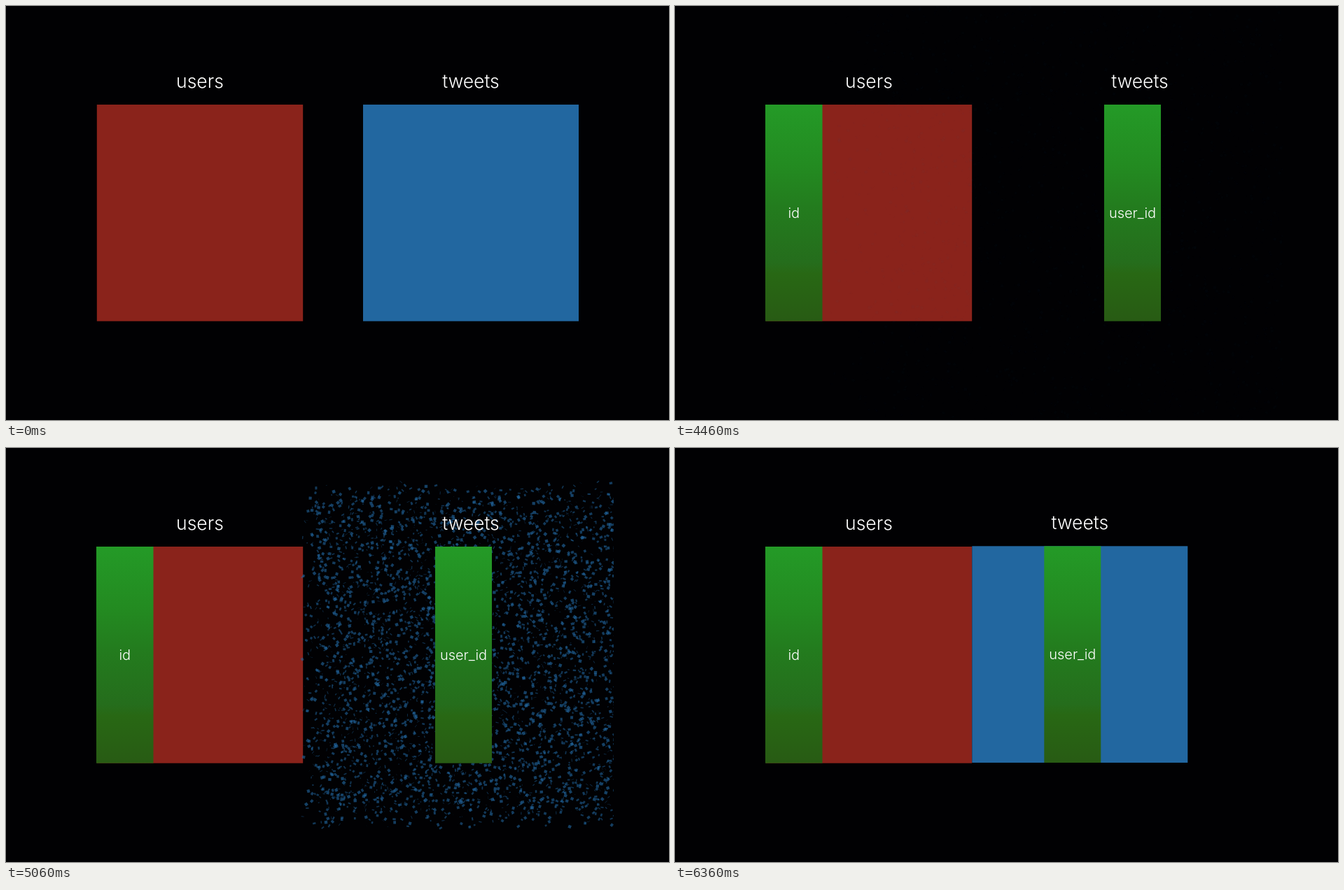
Animation, 947 px wide and 592 px high, one loop 8.66 s. Source, as an HTML page with a canvas:

```html
<!DOCTYPE html>
<html lang="en">
<head>
<meta charset="utf-8">
<title>Joining two tables</title>
<style>
  html, body { margin: 0; width: 100%; height: 100%; overflow: hidden; background: #010103; }
  canvas { display: block; }
</style>
</head>
<body>
<canvas id="stage" width="947" height="592"></canvas>
<script>
const ctx = document.getElementById('stage').getContext('2d');
const LOOP = 8660;
const AT = { keys: 1300, hide: 3230, scatter: 4460, solid: 5427, join: 6360 };
const STEP = 100 / 3;
const RED = '#8a231b', BLUE = '#2267a0', BG = '#010103';
const TOP = 141, SIZE = 309.7;
const FONT = 'Inter, "Liberation Sans", Arial, sans-serif';

// Seeded random numbers keep the confetti identical in every loop
let seed = 4711;
function random() {
  seed = (seed + 0x6d2b79f5) | 0;
  let n = Math.imul(seed ^ (seed >>> 15), 1 | seed);
  n = (n + Math.imul(n ^ (n >>> 7), 61 | n)) ^ n;
  return ((n ^ (n >>> 14)) >>> 0) / 4294967296;
}
const spread = r => (random() * 2 - 1) * r;

const GRID = 70, CELL = 308 / GRID;
const tiles = Array.from({ length: GRID * GRID }, (_, i) => ({
  x: (i % GRID + 0.5) * CELL - 154,
  y: (Math.floor(i / GRID) + 0.5) * CELL - 154,
  dx: spread(26), dy: spread(26),
  tiltX: spread(8.5), tiltY: spread(8.5), turn: spread(14)
}));

const green = ctx.createLinearGradient(0, TOP, 0, TOP + SIZE);
[[0, '#249a27'], [0.28, '#238b21'], [0.47, '#237c1e'],
 [0.73, '#256d1c'], [0.78, '#286814'], [1, '#285b14']]
  .forEach(([at, color]) => green.addColorStop(at, color));

function panel(x, width, fill) {
  ctx.fillStyle = fill;
  ctx.fillRect(x, TOP, width, SIZE);
}

function label(text, x, y, size) {
  ctx.font = `300 ${size}px ${FONT}`;
  ctx.textAlign = 'center';
  ctx.fillStyle = '#fff';
  ctx.fillText(text, x, y);
}

function keyColumn(x, width, text) {
  panel(x, width, green);
  label(text, x + width / 2, 303, 20);
}

function confetti(t) {
  const now = AT.scatter + Math.floor((t - AT.scatter) / STEP) * STEP;
  const left = 1 - (now - 4430) / 1000;
  const reach = 2.05 * (1 - Math.cos(Math.PI * left)) / 2;
  const alpha = 1 - left;
  ctx.save();
  ctx.beginPath();
  ctx.rect(211, 0, 657, 592);
  ctx.clip();
  ctx.fillStyle = BLUE;
  for (const p of tiles) {
    const x = 664 + p.x * (1 + 0.78 * reach) + p.dx * reach;
    const y = 296 + p.y * (1 + 0.85 * reach) + p.dy * reach;
    const w = Math.cos(p.tiltX * left), h = Math.cos(p.tiltY * left);
    const c = Math.cos(p.turn * left), s = Math.sin(p.turn * left);
    ctx.setTransform(w * c, w * s, -h * s, h * c, x, y);
    ctx.globalAlpha = alpha * (0.65 + 0.35 * Math.abs(w * h));
    ctx.fillRect(-CELL / 2, -CELL / 2, CELL, CELL);
  }
  ctx.restore();
}

function draw(t) {
  const keys = t >= AT.keys;
  ctx.fillStyle = BG;
  ctx.fillRect(0, 0, 947, 592);

  panel(129.8, 294.4, RED);
  if (keys) keyColumn(129, 81.5, 'id');
  label('users', 277, 117, 26.5);

  ctx.save();
  if (t >= AT.join) ctx.translate(-85.7, -0.7);
  if (t < AT.hide || t >= AT.solid) panel(510, 308, BLUE);
  else if (t >= AT.scatter) confetti(t);
  if (keys) keyColumn(613, 81, 'user_id');
  label('tweets', 664, 117, 26.5);
  ctx.restore();
}

const start = performance.now();
function tick() {
  draw((performance.now() - start) % LOOP);
  requestAnimationFrame(tick);
}
tick();
</script>
</body>
</html>
```
